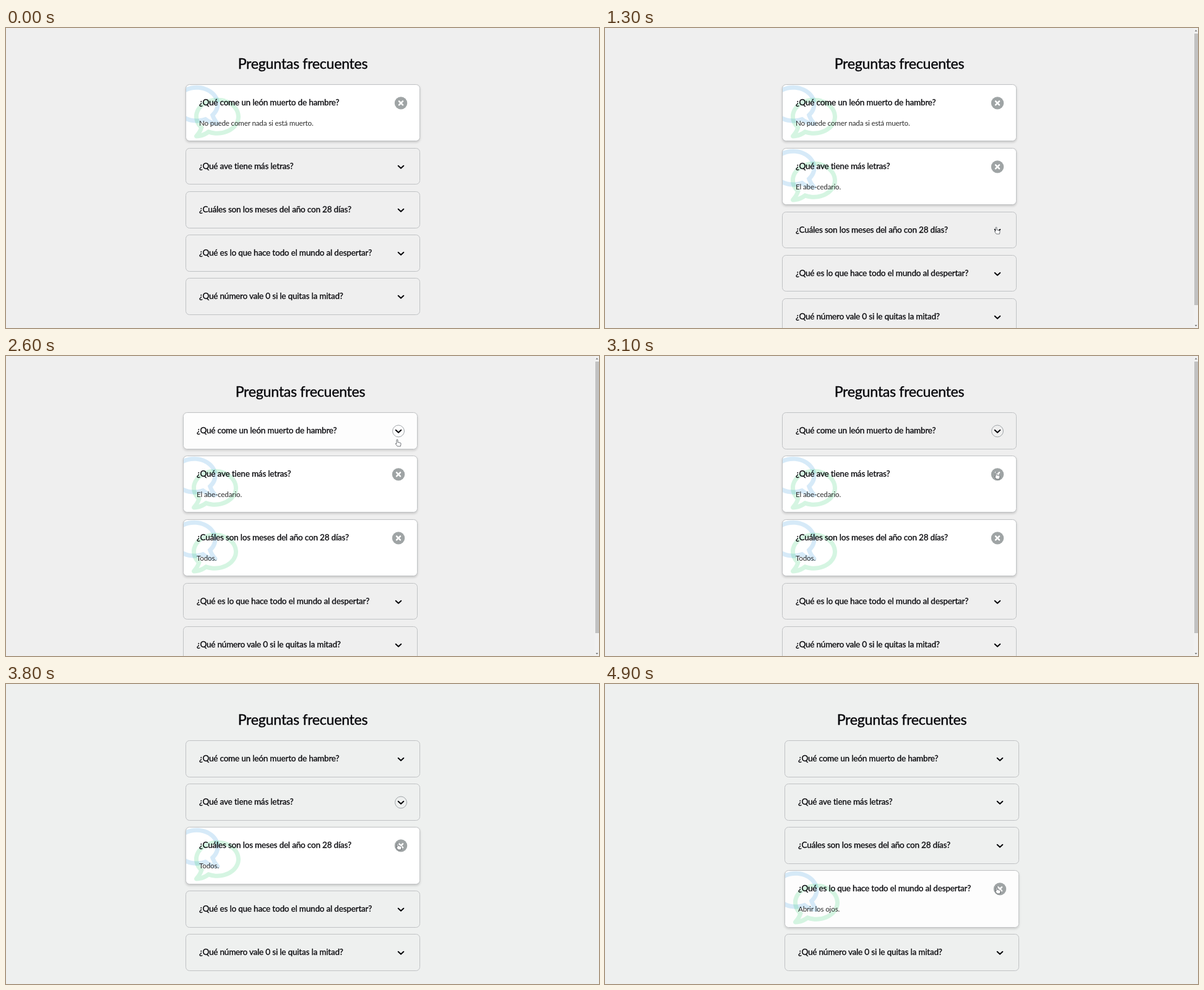
These frames come from a looping animation (958x485 px, 5 s). An HTML page:

```html
<!DOCTYPE html>
<html lang="es">
<head>
<meta charset="utf-8">
<title>Preguntas frecuentes</title>
<style>
html, body { margin: 0; width: 100%; height: 100%; overflow: hidden; background: #efefef; }
body { position: relative; font-family: Lato, "Open Sans", sans-serif; color: #08080c; }
#page { position: absolute; left: 290px; top: 0; width: 379px; }
h1, h2, p { position: absolute; margin: 0; font-weight: 400; white-space: nowrap; }
h1 { left: 0; right: 0; top: 42px; font-size: 23.2px; line-height: 30px; letter-spacing: -.29px; text-align: center; -webkit-text-stroke: .4px; }
h2 { left: 21px; top: 18px; font-size: 13.5px; line-height: 20px; letter-spacing: -.18px; -webkit-text-stroke: .3px; }
p { left: 21px; top: 52px; font-size: 11.6px; line-height: 20px; letter-spacing: -.14px; color: #2a2a2a; }
#list { position: absolute; top: 91px; width: 100%; }
.card { position: relative; box-sizing: border-box; height: 59.6px; margin-bottom: 10.5px; overflow: hidden; border: 1px solid #c0c2c4; border-radius: 6.5px; }
.card.open { height: 92.4px; }
.card svg { position: absolute; left: -1px; top: -1px; }
.card:not(.open) .on, .card.open .off, .card:not(.focus) .ring { display: none; }
#bar { position: absolute; right: 0; top: 0; width: 7px; height: 100%; background: #f1f1f1; }
#thumb { position: absolute; left: 1px; top: 9px; width: 6px; background: #c1c1c1; }
#bar svg, #cursor { position: absolute; left: 0; top: 0; overflow: visible; }
</style>
</head>
<body>
<div id="page"><h1>Preguntas frecuentes</h1><div id="list"></div></div>
<div id="bar">
  <div id="thumb"></div>
  <svg width="7" height="485"><path d="M1.7 5.5h4l-2-2.4zM1.7 480h4l-2 2.4z" fill="#777"/></svg>
</div>
<svg id="cursor" width="12" height="14" fill="#fff" stroke="#50545a" stroke-width=".8" stroke-linejoin="round"><path/></svg>
<script>
const LOOP = 5000, STEP = 100, FADE = 300;
const faqs = [
  ["¿Qué come un león muerto de hambre?", "No puede comer nada si está muerto."],
  ["¿Qué ave tiene más letras?", "El abe-cedario."],
  ["¿Cuáles son los meses del año con 28 días?", "Todos."],
  ["¿Qué es lo que hace todo el mundo al despertar?", "Abrir los ojos."],
  ["¿Qué número vale 0 si le quitas la mitad?", "La cifra 8."]
];
// [time, card]
const clicks = [[800, 1], [1500, 2], [2530, 0], [3150, 1], [3900, 2], [4670, 3]];
// [time, x, y, hand]
const route = [
  [100, 731, 262, 0], [500, 637, 221, 1], [900, 637, 221, 1], [1250, 632, 322, 1],
  [1700, 632, 322, 0], [2100, 644, 137, 0], [2400, 632, 135, 1], [2700, 632, 135, 0],
  [3000, 632, 188, 1], [3250, 632, 188, 0], [3500, 632, 251, 0], [3700, 633, 257, 1],
  [4000, 633, 257, 0], [4300, 631, 326, 1], [4700, 631, 326, 1], [4900, 633, 328, 1]
];
const hand = "M-1 1a1 1 0 0 1 2 0v3.5l4 .8q1.3.3 1 2l-.7 3.7h-5l-3-4q0-1.3 1.7-.3z";
const arrow = "M0 0v7.5l1.8-1.6 1.2 2.8 1.2-.5-1.2-2.8h2.4z";
const bubble = "M256 32C115 32 0 125 0 240c0 48 20 91 53 126-15 40-46 73-46 73-7 7-9 18-5 27s12 14 22 14c61 0 110-26 139-46 29 9 60 14 93 14 141 0 256-93 256-208S397 32 256 32z"
  + "m0 368c-27 0-53-4-78-12l-23-7-20 13c-14 10-33 22-57 29 7-12 14-25 20-40l10-28-20-22C70 314 48 282 48 240c0-88 93-160 208-160s208 72 208 160-93 160-208 160z";

const $ = id => document.getElementById(id);
const icon = `<g transform="translate(348 30.4)" fill="none" stroke-linecap="round" stroke-linejoin="round">
  <g class="on"><circle r="10.2" fill="#9fa4a5"/><path d="M-3 -3L3 3M3 -3L-3 3" stroke="#fff" stroke-width="2.5"/></g>
  <g class="off"><circle class="ring" r="9.5" stroke="#9fa4a8"/><path d="M-4.3 -1.7L0 2.4L4.3 -1.7" stroke="#08080c" stroke-width="2"/></g></g>`;
const bubbles = `<g class="on" fill-opacity=".2" fill-rule="evenodd">
  <path d="${bubble}" fill="#3498db" transform="translate(55.5 -3) scale(-.1465 .1465)"/>
  <path d="${bubble}" fill="#2ecc71" transform="translate(14 17.1) scale(.1465)"/></g>`;
$("list").innerHTML = faqs.map(([q, a]) =>
  `<div class="card"><svg width="379" height="93">${bubbles}${icon}</svg><h2>${q}</h2><p class="on">${a}</p></div>`).join("");
const cards = [...document.querySelectorAll(".card")];

const smooth = p => p * p * (3 - 2 * p);
const clamp = p => Math.max(0, Math.min(1, p));

function drawCards(t) {
  const state = cards.map((_, i) => ({ open: i === 0, since: -FADE }));
  let focus = -1;
  for (const [at, i] of clicks) if (t >= at) {
    state[i] = { open: !state[i].open, since: at };
    focus = i;
  }
  cards.forEach((card, i) => {
    const { open, since } = state[i];
    const p = smooth(clamp((t - since) / FADE)), k = open ? p : 1 - p;
    card.classList.toggle("open", open);
    card.classList.toggle("focus", i === focus);
    card.style.background = `rgba(255,255,255,${k})`;
    card.style.boxShadow = `0 1.9px 3.8px rgba(0,0,0,${.17 * k})`;
  });
  const count = state.filter(s => s.open).length, scrolls = count > 1;
  $("bar").style.display = scrolls ? "" : "none";
  $("thumb").style.height = (count > 2 ? 413 : 439) + "px";
  $("page").style.left = (scrolls ? 286 : 290) + "px";
}

function drawCursor(t) {
  const cursor = $("cursor");
  cursor.style.display = t < route[0][0] ? "none" : "";
  const n = Math.max(0, route.findLastIndex(r => t >= r[0]));
  const a = route[n], b = route[n + 1] || a;
  const p = smooth(clamp((t - a[0]) / (b[0] - a[0] || 1)));
  const mix = i => a[i] + (b[i] - a[i]) * p;
  cursor.style.transform = `translate(${mix(1)}px,${mix(2)}px)`;
  cursor.firstChild.setAttribute("d", a[3] ? hand : arrow);
}

function frame() {
  const t = Math.floor(performance.now() % LOOP / STEP) * STEP;
  document.body.style.background = t < 3700 ? "#efefef" : "#eef0ef";
  drawCards(t);
  drawCursor(t);
  requestAnimationFrame(frame);
}
frame();
</script>
</body>
</html>
```
